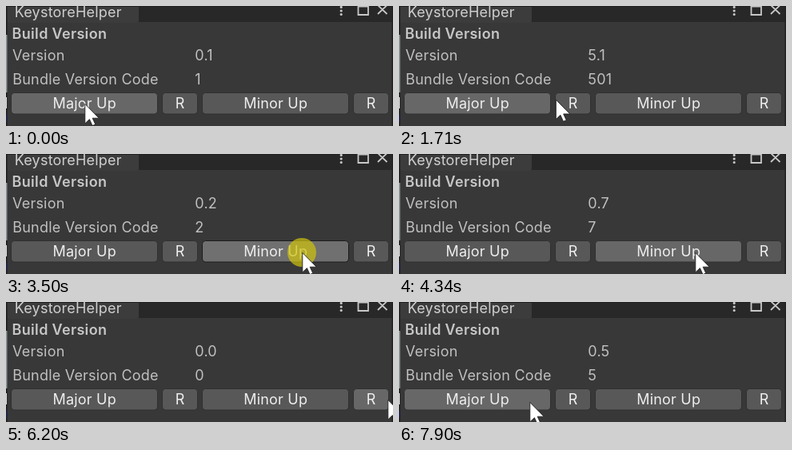
An HTML page that plays this animation: 484x150 px, repeating every 8000 ms.

```html
<!DOCTYPE html>
<html lang="en">
<head>
<meta charset="utf-8">
<title>Build version panel</title>
<style>
  html, body { margin: 0; width: 100%; height: 100%; overflow: hidden; background: #383838; }
  svg { display: block; width: 484px; height: 150px; }
  text { font: 18px Inter, sans-serif; letter-spacing: .2px; fill: #c0c0c0; white-space: pre; }
  .title { font-weight: 600; letter-spacing: .33px; fill: #c6c6c6; }
  .tab { fill: #cfcfcf; }
  .btn rect { fill: #585858; stroke: #303030; }
  .btn text { fill: #eee; text-anchor: middle; }
  .btn.hover rect { fill: #676767; }
  .btn.down rect { fill: #707070; stroke: #1c1c1c; }
  .icon { fill: none; stroke: #c8c8c8; stroke-width: 1.8; }
  .dots { stroke-width: 3.2; stroke-linecap: round; stroke-dasharray: 0 4.5; }
</style>
</head>
<body>
<svg viewBox="0 0 484 150">
  <rect width="484" height="150" fill="#383838"/>
  <rect width="484" height="20" fill="#282828"/>
  <rect x="1" y="-5" width="165" height="26" rx="3" fill="#3c3c3c"/>
  <rect width="484" height="1" fill="#202020"/>
  <rect width="1.5" height="150" fill="#1c1c1c"/>
  <rect y="36" width="1.5" height="72" fill="#8c9898"/>
  <rect y="114" width="1" height="14" fill="#e0e0e0"/>
  <rect y="136" width="1.5" height="9" fill="#1d2350"/>
  <rect x="482.5" width="1.5" height="150" fill="#202020"/>

  <text class="tab" x="10.7" y="14">KeystoreHelper</text>
  <path class="icon dots" d="M419.2 1.5v9.1"/>
  <path class="icon" d="M440.5 .5h12.5v10.5h-12.5zM465 -1l11.500 11m0 -11l-11.500 11"/>

  <text class="title" x="7.5" y="41">Build Version</text>
  <text x="8" y="68">Version</text>
  <text x="8.3" y="98">Bundle Version Code</text>
  <text id="version" x="236.3" y="68">0.1</text>
  <text id="code" x="236.3" y="98">1</text>

  <g id="buttons"></g>
  <g id="pointer">
    <circle id="ring" r="18" fill="rgba(208,195,14,.7)"/>
    <path transform="translate(.8 .4)" fill="#fff" stroke="#222" stroke-width=".9" stroke-linejoin="round"
          d="M0 0V24.500L5.600 19.200L9.200 27.200L13 25.600L9.400 17.800H17.500Z"/>
  </g>
</svg>
<script>
const LOOP = 8000, STEP = 75, HOLD = 75;
const MAJOR = 0, MAJOR_RESET = 1, MINOR = 2, MINOR_RESET = 3;
const $ = id => document.getElementById(id);

const buttons = [
  ['Major Up', 7, 182], ['R', 196, 43], ['Minor Up', 246, 182], ['R', 435, 43]
].map(([label, x, w]) => {
  const g = document.createElementNS('http://www.w3.org/2000/svg', 'g');
  g.innerHTML = `<rect x="${x - .5}" y="108.5" width="${w + 1}" height="26.5" rx="4"/>
    <text x="${x + w / 2 + .2}" y="128">${label}</text>`;
  return $('buttons').appendChild(g);
});

const burst = (start, count = 1, period = 0, hold = HOLD) => ({ start, count, period, hold });

// The pointer travels to each button in turn and clicks it in bursts.
const visits = [
  { button: MAJOR, start: 80, steps: 1, to: [98, 119],
    bursts: [burst(330, 2, 460, 145), burst(1090, 3, 155)] },
  { button: MAJOR_RESET, start: 1555, steps: 4, to: [228, 116], bursts: [burst(2180, 1, 0, 150)] },
  { button: MINOR, start: 3040, steps: 4, to: [370, 123],
    bursts: [burst(3345, 4, 385), burst(3495, 4, 385)] },
  { button: MINOR_RESET, start: 5120, steps: 10, to: [477, 122], bursts: [burst(6120)] },
  { button: MINOR, start: 6430, steps: 6, to: [389, 122],
    bursts: [burst(6900, 2, 160), burst(7300, 3, 152)] },
  { button: MAJOR, start: 7740, steps: 3, to: [163, 125], bursts: [] }
];

const press = {
  [MAJOR]: s => s.major++,
  [MAJOR_RESET]: s => s.major = 0,
  [MINOR]: s => s.minor++,
  [MINOR_RESET]: s => s.minor = 0
};

function stateAt(t) {
  const s = { x: 98, y: 122, major: 0, minor: 1, hover: MAJOR, down: -1 };
  for (const { button, start, steps, to, bursts } of visits) {
    if (t < start) break;
    const p = Math.min(1, (Math.floor((t - start) / STEP) + 1) / steps);
    s.x += (to[0] - s.x) * p;
    s.y += (to[1] - s.y) * p;
    if (p === 1) s.hover = button;
    for (const b of bursts) {
      for (let i = 0; i < b.count; i++) {
        const age = t - b.start - i * b.period;
        if (age >= b.hold) press[button](s);
        else if (age >= 0) s.down = button;
      }
    }
  }
  return s;
}

function draw() {
  const s = stateAt(performance.now() % LOOP);
  $('version').textContent = `${s.major}.${s.minor}`;
  $('code').textContent = s.major * 100 + s.minor;
  buttons.forEach((b, i) => b.setAttribute('class',
    'btn' + (i === s.down ? ' down' : i === s.hover ? ' hover' : '')));
  $('pointer').setAttribute('transform', `translate(${s.x} ${s.y})`);
  $('ring').style.display = s.down < 0 ? 'none' : '';
  requestAnimationFrame(draw);
}
draw();
</script>
</body>
</html>
```
